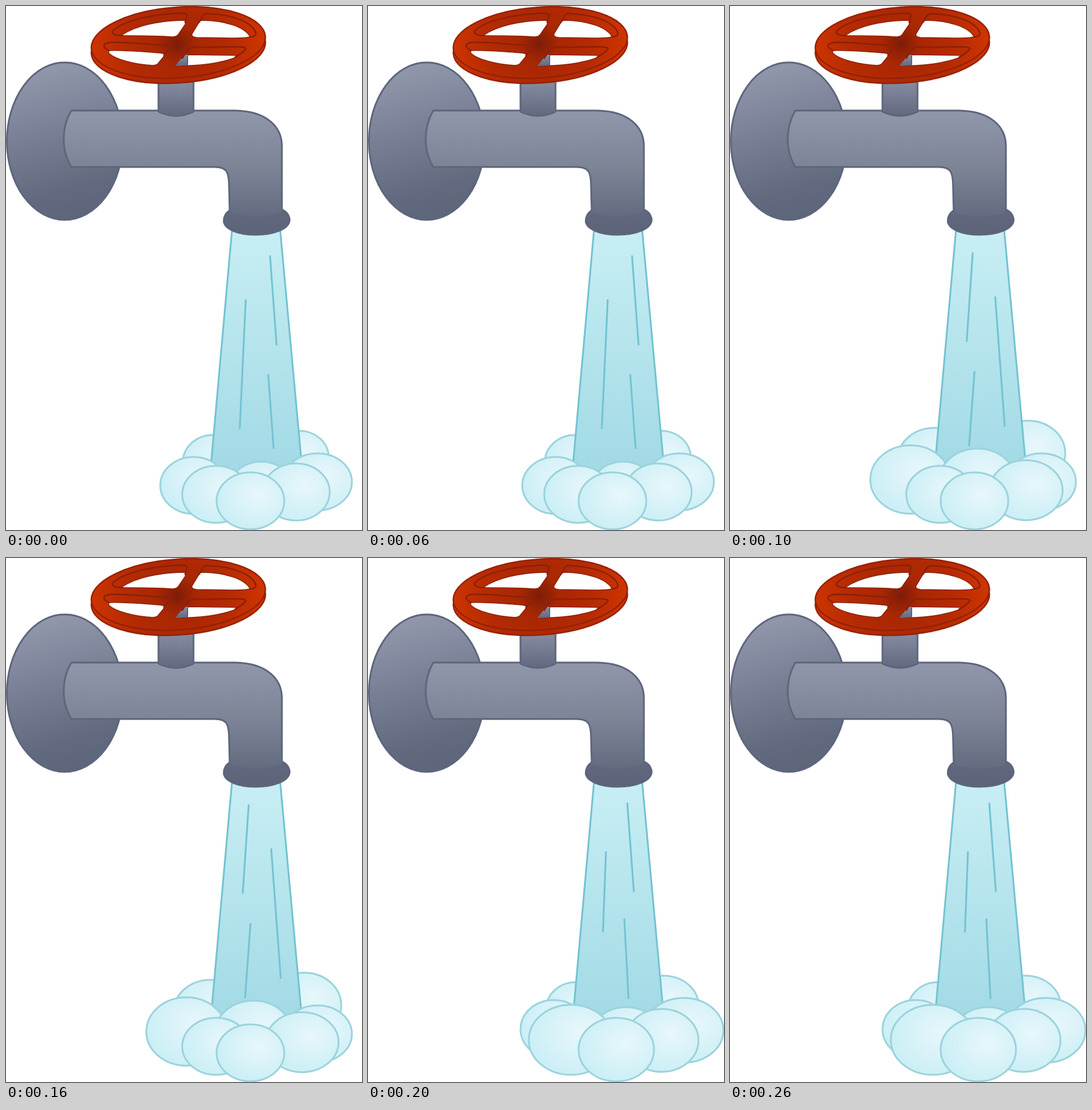
An HTML page that plays this animation: 600 by 882 pixels, repeating every 300 ms.

```html
<!DOCTYPE html>
<html lang="en">
<head>
<meta charset="utf-8">
<title>Running tap</title>
<style>
  html, body { margin: 0; width: 100%; height: 100%; overflow: hidden; background: #fff; }
  svg { display: block; width: 600px; height: 882px; }
  .metal { stroke: #5d667d; stroke-width: 3; stroke-linejoin: round; }
  .rim { stroke: #962107; stroke-width: 2.5; }
  .groove { fill: none; stroke: #8f1f08; stroke-width: 2.5; stroke-linecap: round; }
  .hole { fill: #fff; stroke: #8f1f08; stroke-width: 1.5; }
  .streak { fill: none; stroke: #73c3d1; stroke-width: 3; stroke-linecap: round; }
  .bubble { fill: url(#foam); stroke: #9bd3dc; stroke-width: 3; }
</style>
</head>
<body>
<svg viewBox="0 0 600 882">
  <defs>
    <linearGradient id="plate" x1=".4" y1="0" x2=".6" y2="1">
      <stop offset="0" stop-color="#9298ac"/><stop offset=".8" stop-color="#626a80"/><stop offset="1" stop-color="#5d657b"/>
    </linearGradient>
    <linearGradient id="pipe" gradientUnits="userSpaceOnUse" x1="0" y1="176" x2="0" y2="386">
      <stop offset="0" stop-color="#9197ab"/><stop offset=".45" stop-color="#7c8496"/><stop offset=".95" stop-color="#5d657b"/>
    </linearGradient>
    <linearGradient id="stem" x1="0" y1="0" x2="0" y2="1">
      <stop offset="0" stop-color="#8a90a4"/><stop offset="1" stop-color="#62697f"/>
    </linearGradient>
    <linearGradient id="water" gradientUnits="userSpaceOnUse" x1="0" y1="378" x2="0" y2="775">
      <stop offset="0" stop-color="#c8eef4"/><stop offset="1" stop-color="#a2dae5"/>
    </linearGradient>
    <radialGradient id="red" gradientUnits="userSpaceOnUse" cx="288" cy="63" r="150">
      <stop offset="0" stop-color="#7d1c08"/><stop offset=".22" stop-color="#a82703"/>
      <stop offset=".6" stop-color="#b52b02"/><stop offset="1" stop-color="#d03500"/>
    </radialGradient>
    <radialGradient id="foam" cx=".62" cy=".4" r=".6">
      <stop offset="0" stop-color="#e8f7fb"/><stop offset="1" stop-color="#cceff6"/>
    </radialGradient>
  </defs>

  <g id="back"></g>
  <path d="M381 376L343 800H501L462 376Z" fill="url(#water)" stroke="#73c3d1" stroke-width="3"/>
  <path id="streaks" class="streak"/>
  <g id="front"></g>

  <g class="metal">
    <ellipse cx="99" cy="227.5" rx="97.5" ry="132.5" fill="url(#plate)"/>
    <path fill="url(#pipe)" d="M110 176H386C438 177 465 202 465 236V343C474 346 478 354 478 361C476 376 450 385 421 385C392 385 368 376 367 362C367 354 371 348 377 344L376 305C376 279 372 271 352 271H110C93 243 93 205 110 176Z"/>
    <path fill="url(#stem)" d="M257 120V178Q287 192 316 178V120Z"/>
  </g>
  <path fill="#5d657b" d="M377 344C371 348 367 354 367 362C368 376 392 385 421 385C450 385 476 376 478 361C478 354 474 346 465 343Q465 352 421 354Q377 352 377 344Z" opacity=".55"/>

  <g fill="url(#red)">
    <ellipse class="rim" cx="290.5" cy="70" rx="147" ry="59.5" transform="rotate(-4 290.5 70)"/>
    <ellipse class="rim" cx="290.5" cy="61.5" rx="147" ry="59.5" transform="rotate(-4 290.5 61.5)"/>
  </g>
  <path class="hole" d="M197 48C218 34 255 25 299 24Q306 25 302 31L291 47Q288 52 281 52C255 50 225 50 200 50Q194 50 197 48Z
    M332 24C370 25 401 35 411 51Q412 54 380 54L321 53Q311 52 314 46L325 28Q327 24 332 24Z
    M175 75C200 74 240 78 260 79Q269 80 266 85L256 97Q253 100 247 100C215 98 185 90 174 80Q171 75 175 75Z
    M303 82L386 83Q394 83 386 87C362 96 325 101 285 101L298 85Q300 82 303 82Z"/>
  <path fill="url(#stem)" d="M303 82H306V100L285 101L298 85Q300 82 303 82Z"/>
  <path stroke="#5d667d" stroke-width="2" d="M306 83V100"/>
  <path class="groove" d="M196 50Q176 49 180 42C198 24 250 13 300 12Q308 13 304 20L302 28
    M325 28L331 17Q334 12 342 13C385 15 415 28 421 45Q422 52 411 52
    M174 75Q163 70 166 65Q170 61 180 61C215 61 250 66 268 66Q279 67 273 74L266 84
    M297 88L306 74Q309 69 318 69C350 70 375 68 397 69Q407 70 403 74Q396 81 386 86"/>
</svg>
<script>
const STEP = 100;

// Bubbles: cx, cy, rx, ry; the first two sit behind the water.
const still = {
  right: [525, 801, 58, 48],
  midLeft: [354, 822, 57, 48],
  nearest: [412, 833, 57, 48]
};
const poses = [
  {
    streaks: 'M445 421L456 570M404 495L394 711M442 621L451 744',
    bubbles: [[349, 768, 51, 46], [494, 760, 50, 45], [316, 807, 56, 48], still.right,
      [430, 815, 55, 48], still.midLeft, [489, 818, 56.5, 48], still.nearest]
  },
  {
    streaks: 'M409 416L399 564M447 490L463 707M412 616L403 740',
    bubbles: [[345, 762, 62, 52], [503, 753, 62, 55], [304, 797, 67.5, 57.5], still.right,
      [417, 800, 65, 55], still.midLeft, [499, 815, 61.5, 50.5], still.nearest]
  },
  {
    streaks: 'M437 413L448 561M401 495L396 629M432 608L439 741',
    bubbles: [[350, 760, 50, 46], [498, 753, 59, 50], [313, 793, 56, 49], [532, 795, 67, 54.5],
      [435, 805, 60, 49], [342, 811, 71, 59], [495, 812, 62, 53], [418.5, 827.5, 63.5, 53.5]]
  }
];

const find = id => document.getElementById(id);
const bubbles = poses[0].bubbles.map((_, i) => {
  const el = document.createElementNS('http://www.w3.org/2000/svg', 'ellipse');
  el.setAttribute('class', 'bubble');
  find(i < 2 ? 'back' : 'front').append(el);
  return el;
});

function show({ streaks, bubbles: shapes }) {
  find('streaks').setAttribute('d', streaks);
  shapes.forEach((shape, i) =>
    ['cx', 'cy', 'rx', 'ry'].forEach((name, k) => bubbles[i].setAttribute(name, shape[k])));
}

const start = performance.now();
let shown = -1;
function tick() {
  const now = Math.floor((performance.now() - start) / STEP) % poses.length;
  if (now !== shown) show(poses[shown = now]);
  requestAnimationFrame(tick);
}
tick();
</script>
</body>
</html>
```
